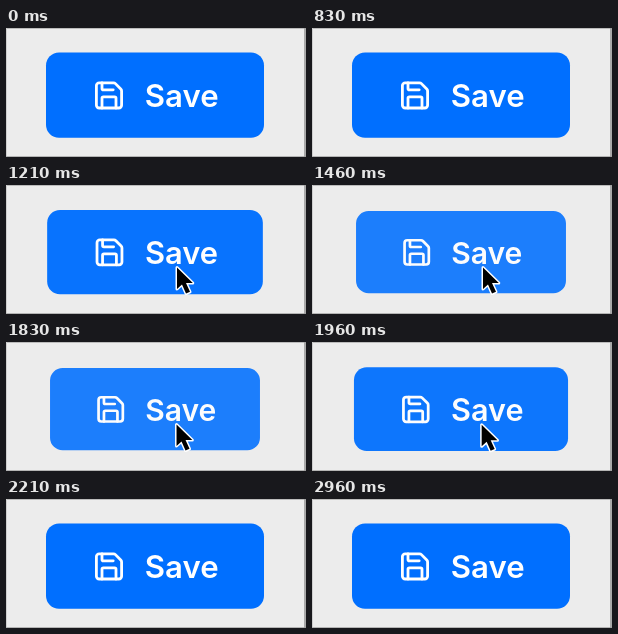
Animation of 300 by 129 pixels, one loop 3040 ms. Source, as an HTML page:

```html
<!DOCTYPE html>
<html lang="en">
<head>
<meta charset="utf-8">
<title>Save button</title>
<style>
  html, body { margin: 0; width: 100%; height: 100%; overflow: hidden; background: #ececec; }
  svg { display: block; width: 100vw; height: 100vh; }
  text { font: 600 31.2px Inter, "Liberation Sans", sans-serif; fill: #fff; }
  .icon { fill: none; stroke: #fff; stroke-width: 2; stroke-linecap: round; stroke-linejoin: round; }
  .pointer { fill: #000; stroke: #fff; stroke-width: 3; stroke-linejoin: round; paint-order: stroke; }
</style>
</head>
<body>
<svg viewBox="0 0 300 129">
  <rect width="300" height="129" fill="#ececec"/>
  <path d="M0 .5H300" stroke="#bcbcbc"/>
  <path d="M.5 0V129" stroke="#cfcfcf"/>
  <path d="M0 128.5H300" stroke="#b4b4b4"/>
  <path d="M299 0V129" stroke="#999" stroke-width="1.6"/>
  <g id="button">
    <rect x="40" y="24.5" width="218" height="85.3" rx="13" fill="#006fff"/>
    <g class="icon" transform="translate(86.2 50.6) scale(1.4)">
      <path d="M15.2 3a2 2 0 0 1 1.4.6l3.8 3.8a2 2 0 0 1 .6 1.4V19a2 2 0 0 1-2 2H5a2 2 0 0 1-2-2V5a2 2 0 0 1 2-2z"/>
      <path d="M17 21v-7a1 1 0 0 0-1-1H8a1 1 0 0 0-1 1v7"/>
      <path d="M7 3v4a1 1 0 0 0 1 1h7"/>
    </g>
    <text x="138.8" y="79">Save</text>
  </g>
  <path id="pointer" class="pointer" d="M0 0V21.5L5 17L9 26L13 24.3L9 15.5H15.8Z"/>
</svg>
<script>
  const LOOP = 3040;
  const CENTER = [149, 67.2];
  const button = document.getElementById("button");
  const pointer = document.getElementById("pointer");

  // Pointer path: time, x, y
  const path = [
    [880, 166, 133],
    [1120, 171, 82.5],
    [1750, 171, 82.5],
    [1950, 169.7, 82.5],
    [2190, 164, 133]
  ];

  const clamp = v => Math.min(1, Math.max(0, v));
  const smooth = v => v * v * (3 - 2 * v);
  const easeOut = v => 1 - (1 - v) ** 2;
  const ramp = (t, start, length) => clamp((t - start) / length);

  function pointerAt(t) {
    const i = path.findIndex(p => p[0] > t);
    if (i < 0) return path[path.length - 1].slice(1);
    if (i === 0) return path[0].slice(1);
    const [a, b] = [path[i - 1], path[i]];
    const k = smooth(ramp(t, a[0], b[0] - a[0]));
    return [1, 2].map(n => a[n] + (b[n] - a[n]) * k);
  }

  function draw(now) {
    const t = now % LOOP;
    const press = easeOut(ramp(t, 1180, 200)) - easeOut(ramp(t, 1900, 200));
    const [cx, cy] = CENTER;
    button.setAttribute("transform",
      `translate(${cx} ${cy}) scale(${1 - 0.037 * press}) translate(${-cx} ${-cy})`);
    button.setAttribute("opacity", 1 - 0.12 * press);
    pointer.setAttribute("transform", `translate(${pointerAt(t).join(" ")})`);
  }

  const start = performance.now();
  function tick() {
    draw(performance.now() - start);
    requestAnimationFrame(tick);
  }
  tick();
</script>
</body>
</html>
```
